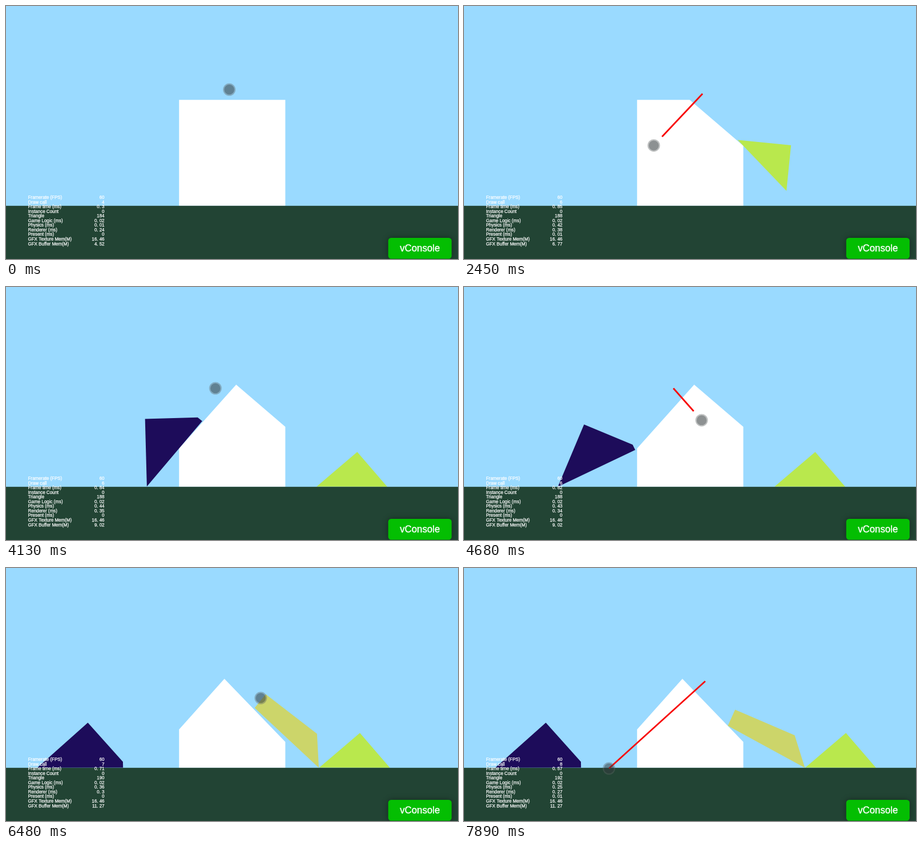
These frames come from a looping animation (831x467 px, 8000 ms). An HTML page with a canvas:

```html
<!DOCTYPE html>
<html lang="en">
<head>
<meta charset="utf-8">
<title>Slice the block</title>
<style>
html, body { margin: 0; width: 100%; height: 100%; overflow: hidden; background: #9adaff; }
canvas { display: block; }
</style>
</head>
<body>
<canvas id="stage" width="831" height="467"></canvas>
<script>
const ctx = document.getElementById('stage').getContext('2d');
const LOOP = 8;
const FLOOR = 368.8;
const GLIDE = 42;        // sideways gain on a slope, px per s²
const TRAIL = 0.068;     // how far the red line lags the pointer, s
const RETURN = 0.9;      // pointer travel between strokes, s
const HOME = [410.5, 154.3];
const FONT = '"Liberation Sans", Arial, sans-serif';

const clamp = u => Math.min(1, Math.max(0, u));
const smooth = u => u * u * (3 - 2 * u);
const mix = (a, b, u) => a + (b - a) * u;
const mixPoint = (p, q, u) => [mix(p[0], q[0], u), mix(p[1], q[1], u)];

// Pointer strokes; via is the point passed at time mid on the way to the next one.
const strokes = [
  { start: 0.3, end: 0.9, from: [396, 157], to: [546, 286], via: [482.5, 263.3], mid: 1.48 },
  { start: 2.05, end: 2.634, from: [438.5, 162], to: [308, 301], via: [342.5, 337.3], mid: 3.41 },
  { start: 4.44, end: 5.16, from: [385, 187], to: [540, 363], via: [468.5, 240.3], mid: 6.48 },
  { start: 7.1, end: 7.75, from: [443.5, 209], to: [266.5, 370] }
];

// Each cut line runs left to right; the part above it slides off downhill,
// tips over the corner, lands and comes to rest. Angles in degrees.
const cuts = [
  { time: 1.01, a: [415, 173.2], b: [513.5, 258], color: '#b9e84d',
    tip: 1.9, tilt: 10, land: 2.63, fall: 0.6, power: 2, rest: -40.6, stop: 3.77, endX: 639.2 },
  { time: 2.925, a: [318.2, 298], b: [423, 180.4], color: '#1d0c5a',
    tip: 4, tilt: -2, land: 4.15, fall: 0.757, power: 2, rest: 48.2, stop: 6.3, endX: 159.5 },
  { time: 5.3, a: [401.5, 204.5], b: [513.5, 321], color: '#ccd56a',
    tip: 6.3, tilt: -3, land: 6.48, fall: 1.41, power: 1, rest: -17.4, stop: 7.95, endX: 554.8 }
];

// Part of a polygon above (side -1) or below (side 1) the line a-b.
function clip(poly, { a, b }, side) {
  const dist = p => side * ((b[0] - a[0]) * (p[1] - a[1]) - (b[1] - a[1]) * (p[0] - a[0]));
  const out = [];
  poly.forEach((p, i) => {
    const q = poly[(i + 1) % poly.length], dp = dist(p), dq = dist(q);
    if (dp > 1) out.push(p);
    if ((dp > 1) !== (dq > 1)) out.push(mixPoint(p, q, clamp(dp / (dp - dq))));
  });
  return out;
}

const house = [[[318.2, 173.2], [513.5, 173.2], [513.5, FLOOR], [318.2, FLOOR]]];
cuts.forEach((cut, i) => {
  const part = clip(house[i], cut, -1);
  house.push(clip(house[i], cut, 1));
  cut.mid = [0, 1].map(c => part.reduce((sum, p) => sum + p[c], 0) / part.length);
  cut.shape = part.map(p => [p[0] - cut.mid[0], p[1] - cut.mid[1]]);
  cut.slope = (cut.b[1] - cut.a[1]) / (cut.b[0] - cut.a[0]);
  cut.corner = cut.slope > 0 ? cut.b : cut.a;
});

function rotate([x, y], deg) {
  const r = deg * Math.PI / 180, c = Math.cos(r), s = Math.sin(r);
  return [x * c - y * s, x * s + y * c];
}

// Corners of a cut-off piece at time t.
function place(cut, t) {
  const slideTime = Math.min(t, cut.land);
  const shift = GLIDE * (slideTime - cut.time) ** 2;
  let deg = cut.tilt * clamp((slideTime - cut.tip) / (cut.land - cut.tip)) ** 2;
  const [cx, cy] = cut.corner;
  const offset = rotate([
    cut.mid[0] + Math.sign(cut.slope) * shift - cx,
    cut.mid[1] + Math.abs(cut.slope) * shift - cy
  ], deg);
  let x = cx + offset[0], y = cy + offset[1];
  const landed = t > cut.land;
  if (landed) {
    const since = t - cut.land;
    deg = mix(deg, cut.rest, clamp(since / cut.fall) ** cut.power);
    x = mix(cut.endX, x, (1 - clamp(since / (cut.stop - cut.land))) ** 1.5);
  }
  const shape = cut.shape.map(p => rotate(p, deg));
  const onFloor = FLOOR - Math.max(...shape.map(p => p[1]));
  y = landed ? onFloor : Math.min(y, onFloor);
  return shape.map(p => [p[0] + x, p[1] + y]);
}

const cutCount = t => cuts.filter(c => t >= c.time).length;

function strokeAt(t) {
  return strokes.find((s, i) => t >= s.start && t < (cuts[i] ? cuts[i].time : LOOP));
}

function pointer(t) {
  const i = strokes.filter(s => t >= s.start).length - 1;
  if (i < 0) return mixPoint(HOME, strokes[0].from, smooth(t / strokes[0].start));
  const s = strokes[i], next = strokes[i + 1];
  if (t <= s.end || !next) return mixPoint(s.from, s.to, clamp((t - s.start) / (s.end - s.start)));
  const u = smooth(clamp((t - s.mid) / RETURN + 0.5));
  return s.to.map((p, c) => {
    const bend = 2 * s.via[c] - (p + next.from[c]) / 2;
    return mix(mix(p, bend, u), mix(bend, next.from[c], u), u);
  });
}

function fillPoly(points, color) {
  ctx.beginPath();
  points.forEach(p => ctx.lineTo(...p));
  ctx.closePath();
  ctx.fillStyle = color;
  ctx.fill();
}

function drawPieces(t) {
  const parts = cuts.slice(0, cutCount(t)).map(cut => place(cut, t));
  const [first, , third] = parts;
  if (third) {
    // The last piece shoves the first one along the floor.
    const wall = Math.max(...third.map(p => p[0])) + 0.7;
    const push = Math.max(0, wall - Math.min(...first.map(p => p[0])));
    first.forEach(p => p[0] += push);
  }
  parts.forEach((part, i) => fillPoly(part, cuts[i].color));
}

function drawStroke(t) {
  const stroke = strokeAt(t);
  if (!stroke) return;
  ctx.beginPath();
  ctx.moveTo(...stroke.from);
  ctx.lineTo(...pointer(Math.max(stroke.start, t - TRAIL)));
  ctx.strokeStyle = '#f80000';
  ctx.lineWidth = 3;
  ctx.stroke();
}

function disc([x, y], r, color) {
  ctx.beginPath();
  ctx.arc(x, y, r, 0, Math.PI * 2);
  ctx.fillStyle = color;
  ctx.fill();
}

function drawPointer(t) {
  const at = pointer(t);
  disc(at, 11.5, 'rgba(95,100,100,.4)');
  disc(at, 9.2, 'rgba(10,20,25,.28)');
}

function label(text, x, y, size, align, weight) {
  ctx.font = size + 'px ' + FONT;
  ctx.textAlign = align;
  ctx.fillStyle = ctx.strokeStyle = '#fff';
  ctx.lineWidth = weight;
  ctx.fillText(text, x, y);
  ctx.strokeText(text, x, y);
}

function drawStats(t) {
  const seen = t - 0.25, n = cutCount(seen);
  const calls = 4 + n + (strokeAt(seen) ? 1 : 0);
  const logic = 0.02;
  const physics = n ? 0.44 - 0.0115 * (t - 3.8) ** 2 : 0.01;
  const render = n ? 0.43 - 0.02 * t : 0.24;
  const present = Math.sin(t * 2.6) > 0.05 && strokeAt(seen) ? 0.01 : 0;
  const rows = [
    ['Framerate (FPS)', 60], ['Draw call', calls],
    ['Frame time (ms)', logic + physics + render + 0.03],
    ['Instance Count', 0], ['Triangle', 176 + 2 * calls], ['Game Logic (ms)', logic],
    ['Physics (ms)', physics], ['Renderer (ms)', render], ['Present (ms)', present],
    ['GFX Texture Mem(M)', 16.46], ['GFX Buffer Mem(M)', 4.52 + 2.25 * n]
  ];
  rows.forEach(([name, value], i) => {
    const y = 356 + i * 8.55;
    label(name, 40.5, y, 8.35, 'left', 0.25);
    label(String(+value.toFixed(2)).replace('.', '. '), 181, y, 8.35, 'right', 0.25);
  });
}

function drawButton() {
  ctx.save();
  ctx.shadowColor = 'rgba(0,0,0,.4)';
  ctx.shadowBlur = 10.8;
  ctx.fillStyle = '#04be02';
  ctx.beginPath();
  ctx.roundRect(702.7, 428, 116.6, 38.6, 5.4);
  ctx.fill();
  ctx.restore();
  label('vConsole', 761, 453, 17.6, 'center', 0.4);
}

function draw(t) {
  ctx.fillStyle = '#9adaff';
  ctx.fillRect(0, 0, 831, 467);
  fillPoly(house[cutCount(t)], '#fff');
  drawPieces(t);
  ctx.fillStyle = '#224434';
  ctx.fillRect(0, FLOOR, 831, 467 - FLOOR);
  drawStats(t);
  drawStroke(t);
  drawPointer(t);
  drawButton();
}

const start = performance.now();
function loop() {
  draw((performance.now() - start) / 1000 % LOOP);
  requestAnimationFrame(loop);
}
loop();
</script>
</body>
</html>
```
